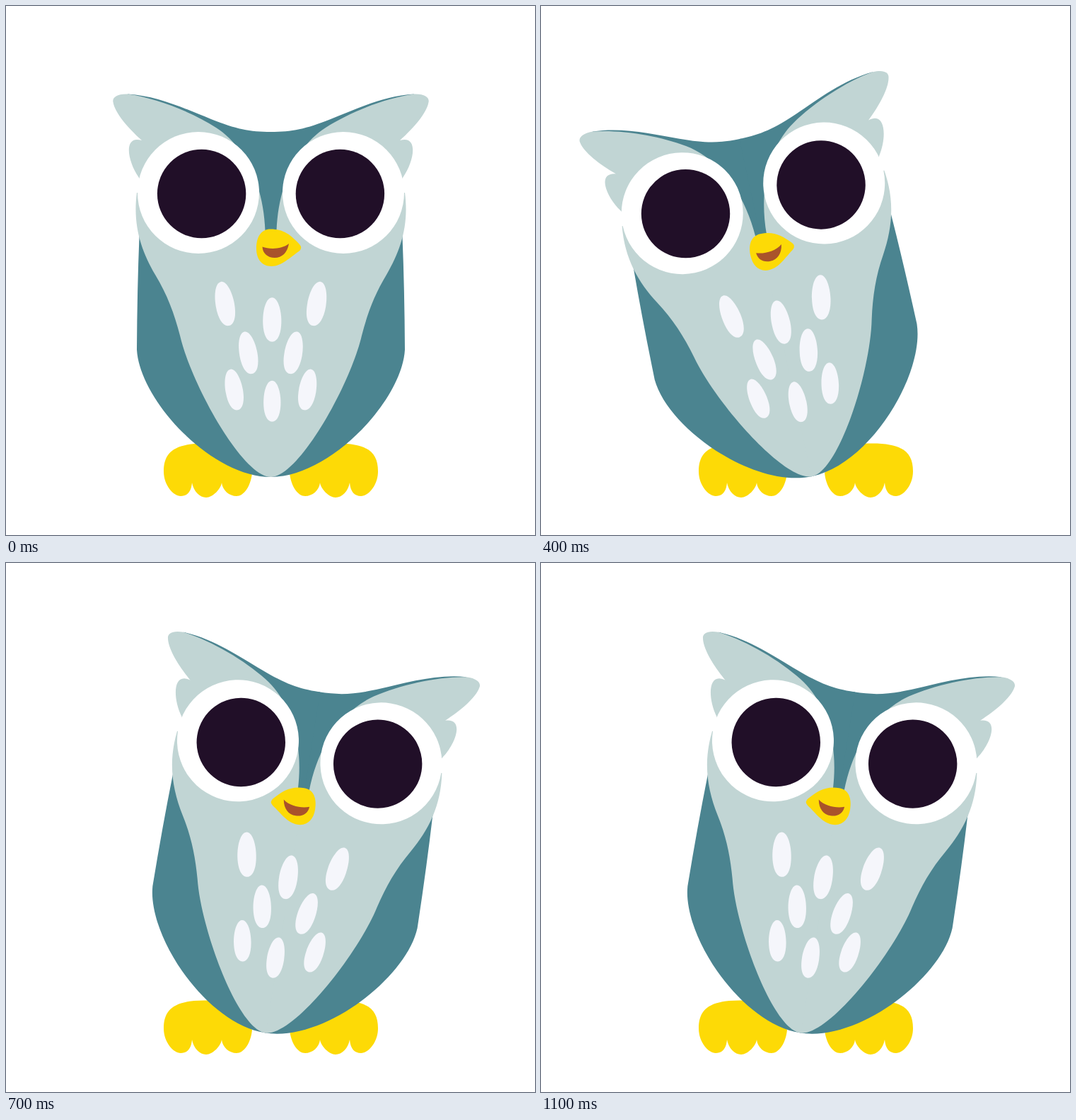
An HTML page for the animation above (1200 ms loop, 748 by 748 pixels).

```html
<!DOCTYPE html>
<html lang="en">
<head>
<meta charset="utf-8">
<title>Rocking owl</title>
<style>
  html, body { margin: 0; width: 100%; height: 100%; overflow: hidden; background: #fff; }
  svg { display: block; width: 100%; height: 100%; }
</style>
</head>
<body>
<svg viewBox="0 0 748 748">
  <defs>
    <path id="foot" fill="#fdda06" d="M295 619C240 616 223 629 223 658C223 678 237 693 247 693
      C256 693 262 687 263 674C265 686 274 695 283 695S304 683 305 674
      C306 685 316 693 326 693S346 680 348 660Z"/>
    <path id="coat" fill="#4b8490" d="M172 124.5C215 127 255 146 290 160S345 178 374.5 178H376V666H374.5
      C290 666 189 557 185 486Q185.500 400 188.500 326L209 170Z"/>
    <path id="face" fill="#c1d5d4" d="M172 124.5C212 130 263 150 297 172C336 197 364 250 366.5 318
      L376 330V666H374.5C335 666 262 535 246 466C238 435 228 408 211 380C191 346 179 310 185 264
      H200L187.5 242C172 220 165 182 192 190C172 172 154 151 151.5 136C150 130 156 124 172 124.5Z"/>
    <g id="eye">
      <circle cx="272" cy="264" r="86" fill="#fff"/>
      <circle cx="276.6" cy="265.5" r="62.7" fill="#210f28"/>
    </g>
    <path id="feather" fill="#f5f6fb" d="M0 -31.5C8 -31.5 13.2 -14 13.2 2C13.2 20 8 31.5 0 31.5
      S-13.2 20 -13.2 2S-8 -31.5 0 -31.5Z"/>
  </defs>
  <g id="feet"></g>
  <g id="owl">
    <g id="body"></g>
    <path fill="#fdda06" d="M354 343C354 326 361 315.5 374 315.5C393 315.5 403 324 415 337
      Q420 342.5 414 347C402 355 390 368 375.5 368S354 357 354 343Z"/>
    <path fill="#a9532b" d="M362.5 340.5C373 344.5 390 344 400 336C398 349 390 356 380 356S363 350 362.5 340.5Z"/>
    <g id="feathers"></g>
  </g>
</svg>
<script>
const MIRROR = 'translate(749) scale(-1 1)';
const STEP = 100;
const HALF = 6;
const MAX_TILT = 13.5;
const get = id => document.getElementById(id);

const pair = id => `<use href="#${id}"/><use href="#${id}" transform="${MIRROR}"/>`;
get('feet').innerHTML = pair('foot');
get('body').innerHTML = pair('coat') + pair('face') + pair('eye');

// Feathers shrink towards the feet; the outer ones lean outwards.
function feather(dx, y) {
  const size = 1 - (y - 425) * 0.0006;
  const tilt = Math.abs(dx) > 5 ? Math.sign(dx) * 10 : 0;
  return `<use href="#feather" transform="translate(${374.5 + dx} ${y}) rotate(${tilt}) scale(${size})"/>`;
}
const featherPair = (dx, y) => feather(-dx, y) + feather(dx, y);
get('feathers').innerHTML = featherPair(65, 421) + feather(1.8, 443.5) +
  featherPair(32, 490.3) + featherPair(52, 542.5) + feather(1.8, 558.7);

const easeOut = p => 4 * p / (1 + 3 * p);

// The owl leans left and back in half a loop, then repeats the lean mirrored.
function draw(time) {
  const step = Math.floor(time / STEP) % (2 * HALF);
  const lean = easeOut(1 - Math.abs(step % HALF / (HALF / 2) - 1));
  const slip = lean * (1 - lean);
  const flip = step > HALF ? MIRROR : '';
  get('owl').setAttribute('transform',
    `${flip} translate(${9.4 * slip} ${-7.4 * slip}) rotate(${-MAX_TILT * lean} 377.5 627.3)`);
}

const start = performance.now();
function tick() {
  draw(performance.now() - start);
  requestAnimationFrame(tick);
}
draw(0);
requestAnimationFrame(tick);
</script>
</body>
</html>
```
